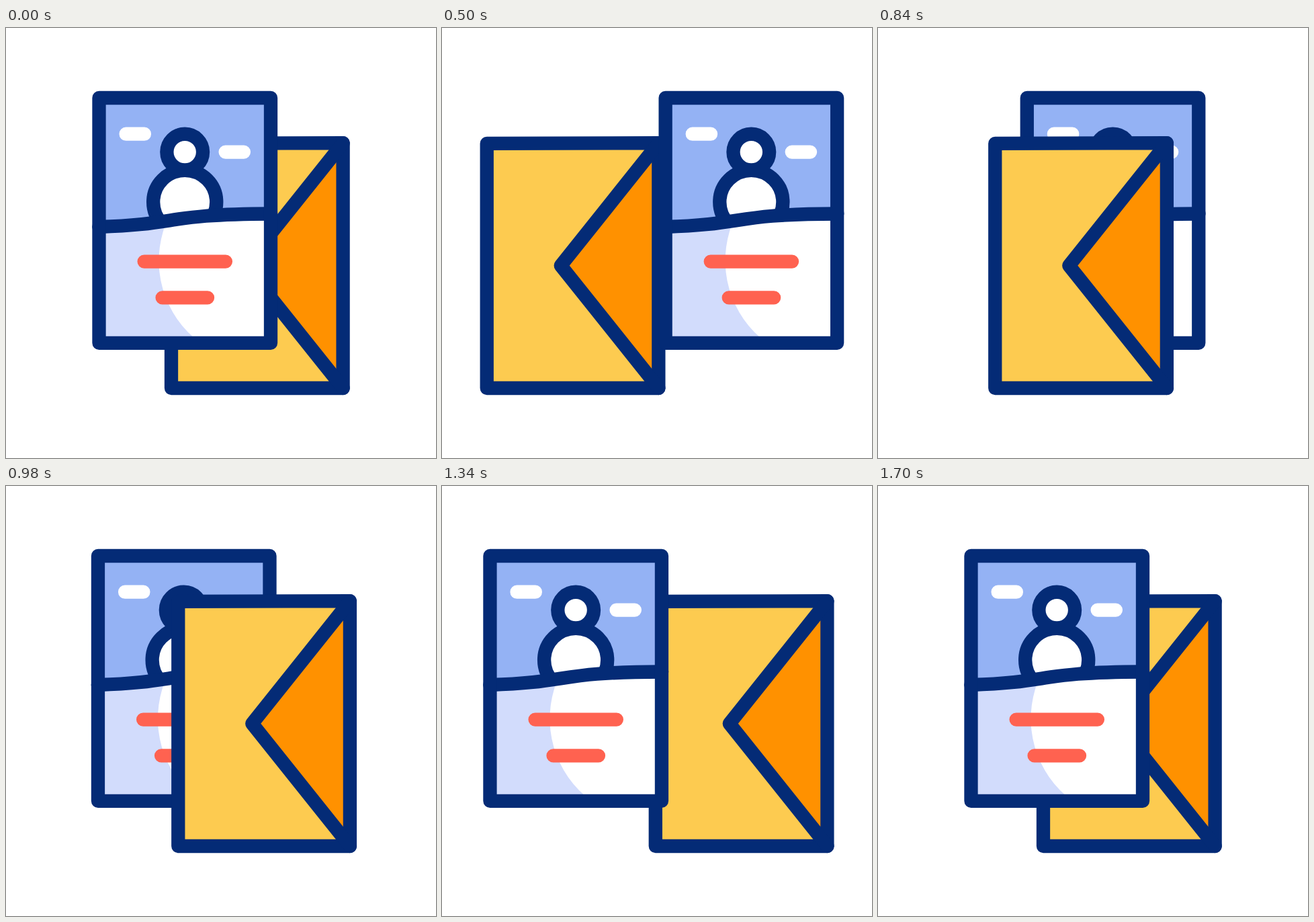
Recreate the animation shown at these times as an HTML page. Size 640 px wide and 640 px high, loop 2.4 s.

```html
<!DOCTYPE html>
<html lang="en">
<head>
<meta charset="utf-8">
<title>Card and envelope</title>
<style>
  html, body { margin: 0; width: 100%; height: 100%; overflow: hidden; background: #fff; }
  svg { display: block; width: 100%; height: 100%; }
  .line { fill: none; stroke: #042b76; }
  .white { stroke: #fff; }
  .red { stroke: #ff6250; }
</style>
</head>
<body>
<svg id="stage" viewBox="0 0 640 640" stroke-width="20.3" stroke-linecap="round" stroke-linejoin="round">
  <g id="envelope">
    <path fill="#fdcb50" d="M246 171.9L501.6 171.2V536H246Z"/>
    <path fill="#ff9100" d="M501.6 171.2L356 353.6L501.6 536Z"/>
    <path class="line" d="M246 171.9L501.6 171.2V536H246Z"/>
    <path class="line" d="M501.7 171.2L356 353.6L501.7 536"/>
  </g>
  <g id="card">
    <path fill="#94b2f4" d="M138.5 104H394V468.8H138.5Z"/>
    <path class="white" d="M178.6 157.7H205.9M326.6 184.6H353.9"/>
    <g class="line" style="fill:#fff">
      <circle cx="266.2" cy="258.9" r="47.05"/>
      <circle cx="266.2" cy="184.6" r="26.85"/>
    </g>
    <path fill="#fff" d="M138.5 296C262 292 236 277 394 276.5V468.8H138.5Z"/>
    <path fill="#d2dcfc" d="M138.5 296L238.3 290A152 152 0 0 0 289.5 468.8H138.5Z"/>
    <path class="red" d="M205.6 347.6H326.9M232.6 401.4H300"/>
    <path class="line" d="M138.3 296C262 292 236 277 394.2 276.5"/>
    <path class="line" d="M138.5 104H394V468.8H138.5Z"/>
  </g>
</svg>
<script>
const LOOP = 2400, STEP = 20, EASE = 0.27;
const KEYS = [
  { t: 0, card: 0, envelope: 0 },
  { t: 560, card: 202.5, envelope: -187 },
  { t: 1200, card: -85, envelope: 91 },
  { t: 1700, card: 0, envelope: 0 }
];
const stage = document.getElementById('stage');
const card = document.getElementById('card');
const envelope = document.getElementById('envelope');

// Symmetric cubic-bezier(EASE, 0, 1 - EASE, 1), solved by bisection.
function ease(x) {
  let lo = 0, hi = 1;
  for (let i = 0; i < 24; i++) {
    const s = (lo + hi) / 2, r = 1 - s;
    const at = 3 * s * r * (EASE * r + (1 - EASE) * s) + s * s * s;
    if (at < x) lo = s; else hi = s;
  }
  return lo * lo * (3 - 2 * lo);
}

function offset(name, t) {
  const i = KEYS.findIndex(key => t < key.t);
  if (i < 0) return 0;
  const a = KEYS[i - 1], b = KEYS[i];
  return a[name] + (b[name] - a[name]) * ease((t - a.t) / (b.t - a.t));
}

function draw(time) {
  const t = Math.floor((time % LOOP) / STEP) * STEP;
  card.setAttribute('transform', `translate(${offset('card', t)} 0)`);
  envelope.setAttribute('transform', `translate(${offset('envelope', t)} 0)`);
  // The envelope passes in front on the middle swing.
  const top = t >= KEYS[1].t && t < KEYS[2].t ? envelope : card;
  if (stage.lastElementChild !== top) stage.appendChild(top);
}

const start = performance.now();
function tick() {
  draw(performance.now() - start);
  requestAnimationFrame(tick);
}
tick();
</script>
</body>
</html>
```
